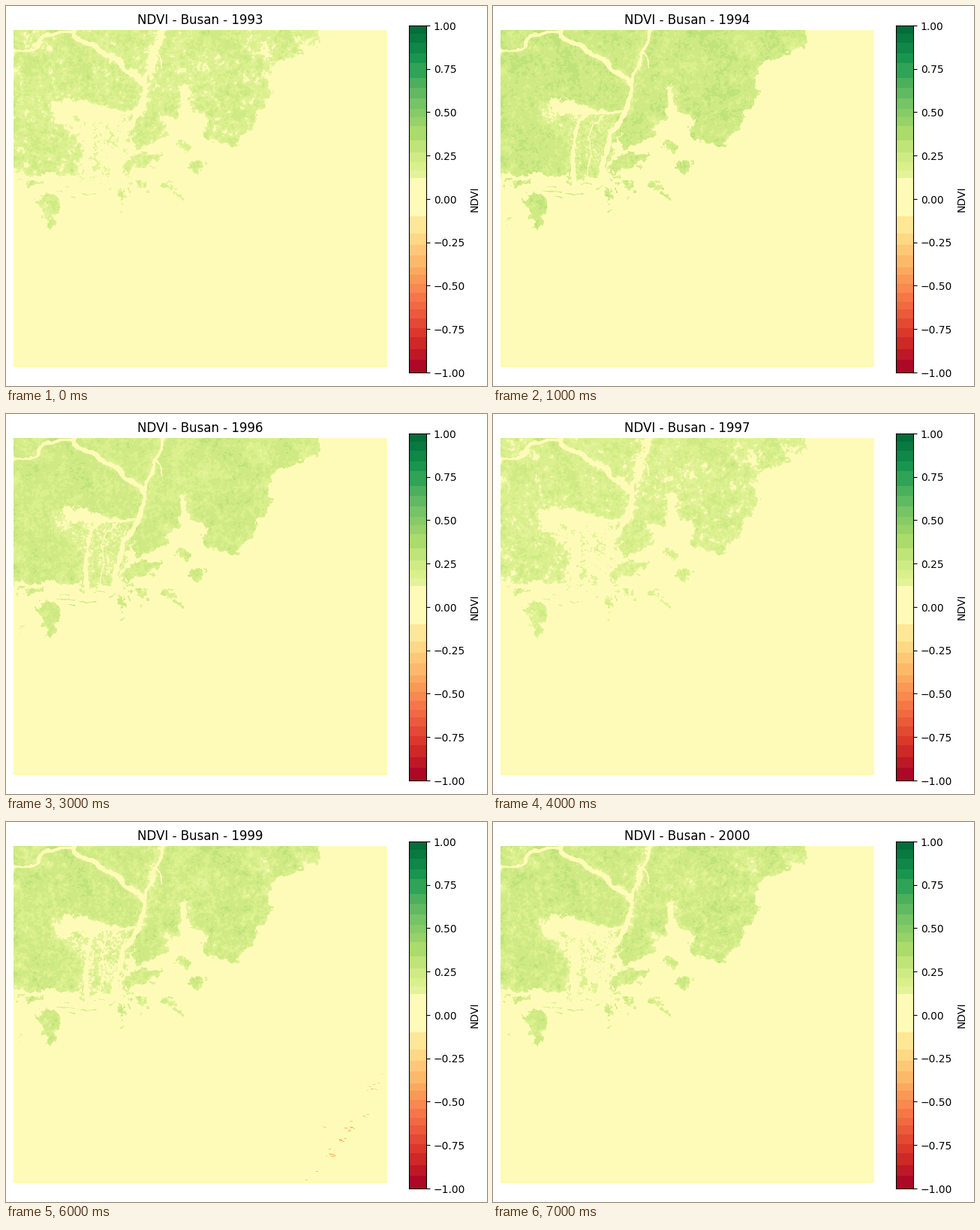
Animation of 641 by 506 pixels, one loop 8000 ms. Source, as a matplotlib script:

```python
import numpy as np
import matplotlib.pyplot as plt
from matplotlib.animation import FuncAnimation
from matplotlib.colors import BoundaryNorm, ListedColormap
from matplotlib.path import Path

W, H = 641, 506
X0, X1, Y0, Y1 = 10, 507, 32, 481
BAR_TOP, BAR_BOTTOM = 26, 488
SEA = "#fefbb8"

# All map geometry is in stage pixels, y pointing down.
gx, gy = np.meshgrid(np.arange(X0, X1) + 0.5, np.arange(Y0, Y1) + 0.5)


def smooth(a, s):
    pad = 16
    a = np.pad(a.astype(float), pad, mode="edge")
    fy = np.fft.fftfreq(a.shape[0])[:, None]
    fx = np.fft.fftfreq(a.shape[1])[None, :]
    kernel = np.exp(-2 * (np.pi * s) ** 2 * (fx ** 2 + fy ** 2))
    out = np.fft.ifft2(np.fft.fft2(a) * kernel).real
    return out[pad:-pad, pad:-pad]


def noise(seed, s):
    n = smooth(np.random.default_rng(seed).normal(size=gx.shape), s)
    return (n - n.mean()) / n.std()


# Warped coordinates give the coast its ragged edge.
qx = gx + 1.9 * noise(1, 2.2) + 1.0 * noise(2, 0.9)
qy = gy + 1.7 * noise(3, 2.2) + 0.9 * noise(4, 0.9)
rx = gx + 0.8 * noise(5, 2.5)
ry = gy + 0.8 * noise(6, 2.5)


def inside(points, x=qx, y=qy):
    pts = np.c_[x.ravel(), y.ravel()]
    return Path(points).contains_points(pts).reshape(gx.shape)


def near(points, width, x=rx, y=ry):
    """Pixels within half a width of a polyline."""
    best = np.full(gx.shape, 1e9)
    for (ax_, ay_), (bx, by) in zip(points, points[1:]):
        dx, dy = bx - ax_, by - ay_
        t = np.clip(((x - ax_) * dx + (y - ay_) * dy) / (dx * dx + dy * dy), 0, 1)
        best = np.minimum(best, np.hypot(x - ax_ - t * dx, y - ay_ - t * dy))
    return best < width / 2


def blob(cx, cy, a, b):
    return ((qx - cx) / a) ** 2 + ((qy - cy) / b) ** 2 < 1


EAST_COAST = [
    (0, 0), (416, 0), (416, 38), (420, 49), (410, 55), (398, 60), (385, 68),
    (372, 73), (361, 76), (352, 82), (350, 93), (347, 108), (350, 118),
    (348, 127), (340, 137), (335, 143), (330, 153), (327, 165), (318, 170),
    (309, 178), (307, 187), (300, 189), (292, 180), (282, 183), (272, 178),
    (262, 176), (262, 162), (270, 154), (258, 149), (250, 146), (244, 150),
    (240, 160), (233, 150), (224, 157), (213, 163), (217, 172), (205, 179),
    (190, 187), (173, 190),
]
WEST_COAST = [
    (167, 181), (174, 166), (164, 176), (160, 194), (153, 207), (147, 222),
    (140, 230), (126, 226), (122, 233), (107, 233), (101, 226), (76, 228),
    (62, 221), (46, 224), (34, 228), (22, 223), (0, 229),
]
GREAT_ISLE = [
    (38, 256), (47, 259), (46, 252), (56, 249), (63, 253), (73, 257), (73, 267),
    (69, 277), (64, 283), (67, 293), (60, 300), (53, 295), (55, 285), (46, 281),
    (49, 272), (40, 264),
]
CAPE = [
    (152, 220), (158, 209), (166, 199), (182, 195), (194, 197), (207, 200),
    (200, 209), (188, 213), (181, 221), (172, 217), (163, 224),
]
ISLES = [
    (231, 184, 6, 5), (240, 188, 9, 6), (249, 215, 5, 7), (257, 214, 5, 9),
    (153, 249, 5, 9), (156, 257, 4, 4), (179, 236, 7, 3.5), (182, 244, 5, 5),
    (167, 242, 3, 3), (212, 238, 5, 3.5), (220, 242, 6, 5), (234, 255, 6, 5),
    (226, 251, 4, 3), (32, 238, 7, 3), (45, 236, 8, 3), (15, 243, 4, 3),
    (19, 286, 3, 1.6), (155, 271, 3, 1.8), (103, 236, 4, 2), (178, 256, 3, 2),
    (166, 229, 5, 2.5), (197, 217, 4, 2.5), (22, 232, 4, 2), (158, 235, 4, 2),
]
BARS = [
    [(72, 241), (84, 243)], [(68, 248), (92, 249)], [(98, 250), (120, 252)],
    [(118, 239), (133, 237)], [(84, 255), (93, 256)], [(138, 243), (146, 240)],
]
RIVERS = [
    (6, [(88, 28), (90, 41), (102, 48), (118, 53), (130, 65), (141, 69),
         (152, 75), (158, 86), (170, 92), (178, 98), (184, 107), (183, 120),
         (179, 133), (175, 148)]),
    (7, [(175, 146), (168, 158), (157, 168), (154, 184), (151, 197), (147, 212),
         (142, 234)]),
    (4, [(176, 141), (150, 143), (128, 145), (116, 153), (110, 168), (109, 190)]),
    (6, [(109, 186), (106, 205), (108, 236)]),
    (4, [(8, 61), (30, 60), (43, 56), (46, 46), (55, 39), (75, 36), (90, 37)]),
    (1.6, [(148, 146), (136, 156), (128, 175), (130, 196), (124, 232)]),
    (4, [(211, 28), (206, 46), (199, 62), (195, 78), (187, 92), (183, 108)]),
    (2, [(199, 62), (205, 68), (208, 82)]),
]
BARE = [
    [(74, 130), (84, 122), (92, 130), (98, 124), (112, 134), (132, 138),
     (160, 141), (120, 145), (78, 144)],
    [(232, 106), (239, 108), (241, 128), (250, 146), (240, 160), (231, 152),
     (234, 130)],
]
DELTA = [
    (76, 138), (172, 140), (166, 164), (158, 190), (152, 236), (104, 236),
    (99, 200), (94, 172), (70, 152),
]
# Built-up valleys: x, y, spread x, spread y, weight
TOWNS = [
    (48, 52, 22, 9, 0.6), (22, 36, 12, 6, 0.5), (66, 128, 9, 20, 0.8),
    (100, 140, 35, 9, 0.8), (28, 122, 15, 8, 0.4), (16, 85, 9, 6, 0.4),
    (60, 85, 9, 9, 0.45), (215, 153, 14, 9, 0.6), (238, 130, 9, 24, 1.0),
    (258, 152, 13, 12, 0.7), (276, 128, 12, 16, 0.5), (252, 92, 6, 22, 0.45),
    (318, 128, 12, 10, 0.4), (195, 70, 9, 32, 0.9), (206, 40, 8, 12, 0.7),
    (298, 78, 22, 14, 0.35), (350, 62, 12, 14, 0.6), (396, 52, 20, 10, 0.6),
    (335, 96, 13, 14, 0.4), (90, 212, 18, 9, 0.4), (60, 152, 20, 8, 0.5),
    (22, 222, 14, 6, 0.4), (182, 122, 7, 30, 0.6), (300, 165, 18, 9, 0.35),
]

land = inside(EAST_COAST + WEST_COAST) | inside(GREAT_ISLE) | inside(CAPE)
for isle in ISLES:
    land |= blob(*isle)
for width, course in RIVERS:
    land &= ~near(course, width)
for patch in BARE:
    land &= ~inside(patch)
for bar in BARS:
    land |= near(bar, 1.5)

town = 0.22 * noise(10, 2.5) + 0.16 * noise(11, 1) + 0.9 * (1 - smooth(land, 3))
for x, y, sx, sy, w in TOWNS:
    town += w * np.exp(-((gx - x) / sx) ** 2 - ((gy - y) / sy) ** 2)
town = np.clip(town, 0, 1.5)
delta = smooth(inside(DELTA), 2.5)
hills = 0.6 * noise(12, 6) + 0.5 * noise(13, 1.8) + 0.5 * noise(14, 0.7)
fields = noise(15, 0.8)

# Year: greenness, loss in towns, loss in the delta fields
YEARS = {
    1993: (0.205, 0.125, 0.100),
    1994: (0.255, 0.070, 0.060),
    1995: (0.245, 0.075, 0.065),
    1996: (0.228, 0.050, 0.060),
    1997: (0.198, 0.115, 0.095),
    1998: (0.220, 0.085, 0.080),
    1999: (0.235, 0.095, 0.085),
    2000: (0.240, 0.105, 0.125),
}
# Reddish streaks at sea: x, y, spread, count
STREAKS = [
    (486, 354, 4, 9), (492, 347, 4, 2), (478, 391, 4, 6), (457, 408, 6, 9),
    (446, 424, 4, 10), (431, 443, 4, 12), (436, 436, 4, 3), (462, 405, 5, 3),
]
SPECKS = [(500, 335), (421, 405), (412, 465), (398, 476), (422, 406)]


def add_streaks(v):
    rng = np.random.default_rng(21)
    spots = list(SPECKS)
    for x, y, r, n in STREAKS:
        spots += [(x + rng.normal() * r * 0.8, y + rng.normal() * r * 0.45)
                  for _ in range(n)]
    for x, y in spots:
        row, col = int(y) - Y0, int(x) - X0
        v[row, col:min(col + rng.integers(1, 5), 491)] = rng.uniform(-0.42, -0.15)


def ndvi(year):
    green, town_loss, farm_loss = YEARS[year]
    v = green + 0.024 * hills + 0.010 * noise(year, 1.2)
    v -= town_loss * town + delta * (farm_loss - 0.022 * fields)
    v = np.where(land, v, 0.0)
    if year == 1999:
        add_streaks(v)
    return v


# Uneven colour bands, given by their edges down the colour bar.
edges_y = [488, 471, 457, 441, 429, 416, 404, 394, 382, 370, 358, 348, 332, 318,
           303, 280, 229, 219, 208, 195, 179, 160, 148, 137, 123, 109, 96, 76,
           63, 49, 37, 26]
mid = (BAR_TOP + BAR_BOTTOM) / 2
edges = (mid - np.array(edges_y)) / (mid - BAR_TOP)
centres = (edges[:-1] + edges[1:]) / 2
colors = [SEA if lo < 0 < hi else plt.cm.RdYlGn((lo + hi + 2) / 4)
          for lo, hi in zip(edges, edges[1:])]
cmap = ListedColormap(colors)
norm = BoundaryNorm(edges, len(colors))

# The small surplus keeps the pixel size from being rounded down.
fig = plt.figure(figsize=((W + 0.01) / 100, (H + 0.01) / 100), dpi=100,
                 facecolor="white")


def axes_at(x0, y0, x1, y1):
    return fig.add_axes([x0 / W, 1 - y1 / H, (x1 - x0) / W, (y1 - y0) / H])


ax = axes_at(X0, Y0, X1, Y1)
ax.axis("off")
maps = [ndvi(year) for year in YEARS]
image = ax.imshow(maps[0], cmap=cmap, norm=norm, interpolation="nearest",
                  aspect="auto")
title = ax.set_title("NDVI - Busan - 1993", fontsize=12)

bar = axes_at(537, BAR_TOP, 560.1, BAR_BOTTOM)
bar.pcolormesh([0, 1], edges, centres[:, None], cmap=cmap, norm=norm)
bar.set_xticks([])
bar.set_ylim(-1, 1)
bar.set_yticks(np.linspace(-1, 1, 9))
bar.yaxis.tick_right()
bar.yaxis.set_label_position("right")
bar.set_ylabel("NDVI")


def draw(i):
    image.set_data(maps[i])
    title.set_text(f"NDVI - Busan - {1993 + i}")
    return image, title


anim = FuncAnimation(fig, draw, frames=len(maps), interval=1000, repeat=True)
plt.show()
```
